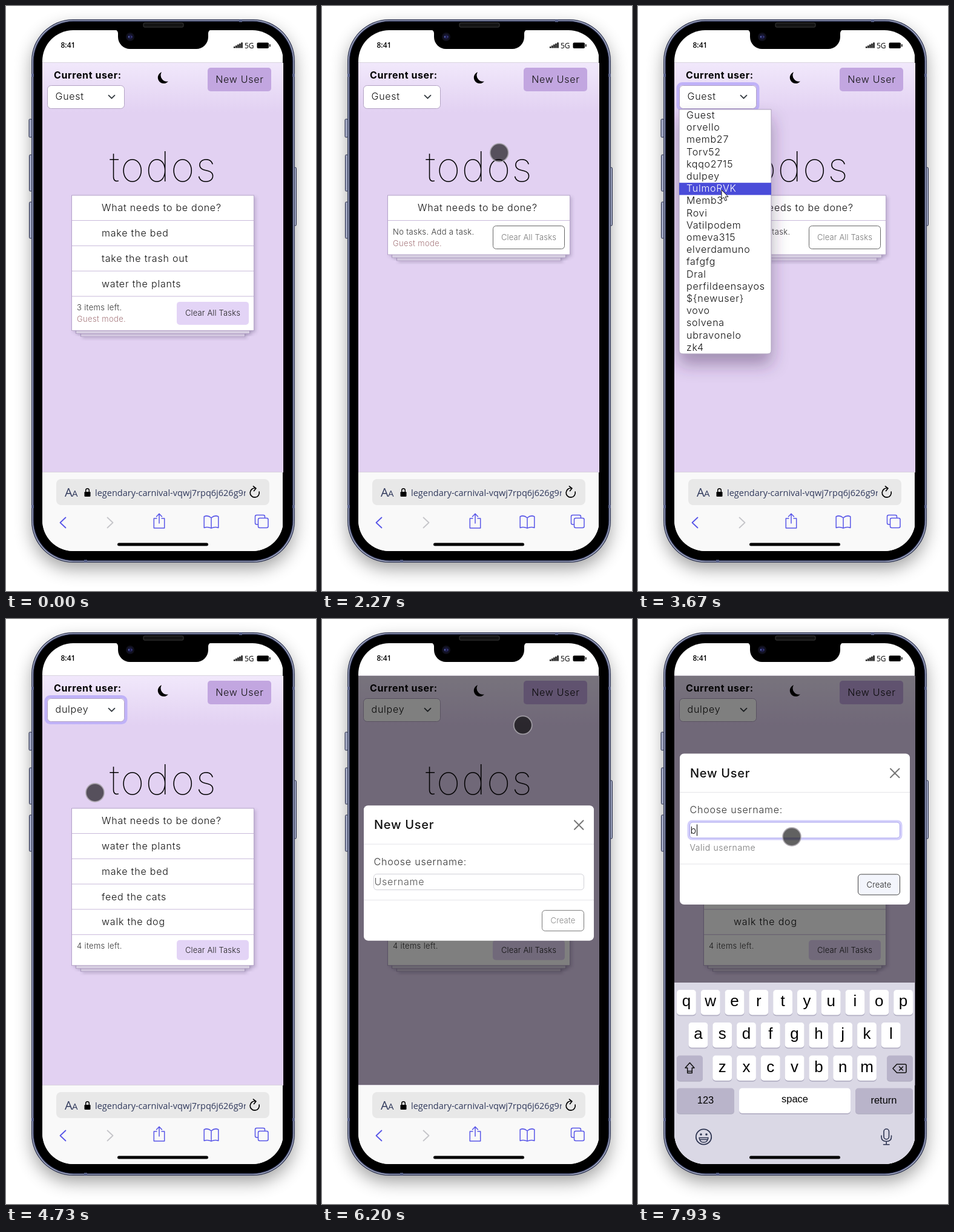
Animation of 512x967 px, one loop 8000 ms. Source, as an HTML page:

```html
<!DOCTYPE html>
<html lang="en">
<head>
<meta charset="utf-8">
<title>Todo app on a phone</title>
<style>
html, body { margin: 0; height: 100%; overflow: hidden; background: #fff; }
svg { display: block; width: 512px; height: 967px; }
text { font: 300 16px Inter, sans-serif; letter-spacing: .8px; fill: #111; white-space: pre; }
.reg { font-weight: 350; letter-spacing: .75px; }
.bold { font-weight: 700; letter-spacing: .6px; fill: #000; }
.small { font-size: 13px; letter-spacing: .35px; fill: #333; }
.btn { font-size: 13px; letter-spacing: .15px; fill: #222; font-weight: 350; }
.mid { text-anchor: middle; }
.title { font-size: 68px; font-weight: 100; letter-spacing: 2px; fill: #000; }
.head { font-size: 20px; font-weight: 450; letter-spacing: .7px; }
.sys { font: 600 12px "Open Sans", sans-serif; letter-spacing: 0; fill: #000; }
.url { font: 400 14.5px "Open Sans", sans-serif; letter-spacing: 0; fill: #30395c; }
.key { font: 400 26px "Liberation Sans", Arial, sans-serif; letter-spacing: 0; text-anchor: middle; fill: #000; }
.word { font-size: 16.5px; }
.line { fill: none; stroke-linecap: round; stroke-linejoin: round; }
</style>
</head>
<body>
<svg viewBox="0 0 512 967">
  <defs>
    <clipPath id="screen"><rect x="60" y="40" width="398" height="861" rx="51"/></clipPath>
    <clipPath id="page"><rect x="60" y="94" width="398" height="677"/></clipPath>
    <clipPath id="urlClip"><rect x="140" y="785" width="256" height="38"/></clipPath>
    <linearGradient id="sky" x2="0" y2="1"><stop stop-color="#f1e8fb"/><stop offset="1" stop-color="#e2d1f2"/></linearGradient>
    <filter id="soft" x="-20%" y="-10%" width="140%" height="120%"><feGaussianBlur stdDeviation="15"/></filter>
    <filter id="drop" x="-50%" y="-20%" width="200%" height="150%"><feDropShadow dx="0" dy="17" stdDeviation="14" flood-color="#3c2850" flood-opacity=".4"/></filter>
    <filter id="lift" x="-10%" y="-20%" width="120%" height="150%"><feDropShadow dx="3" dy="3" stdDeviation="2.5" flood-color="#503c64" flood-opacity=".22"/></filter>
  </defs>
  <rect width="512" height="967" fill="#fff"/>
  <rect x="44" y="36" width="431" height="893" rx="66" opacity=".4" filter="url(#soft)"/>
  <g id="phone"></g>
  <g clip-path="url(#screen)">
    <rect x="60" y="40" width="397" height="861" fill="#fff"/>
    <g id="bars"></g>
    <g clip-path="url(#page)">
      <rect x="60" y="94" width="398" height="677" fill="#e2d1f2"/>
      <rect x="60" y="94" width="398" height="82" fill="url(#sky)"/>
      <g id="header"></g>
      <g id="card"></g>
      <g id="list"></g>
      <rect id="dim" x="60" y="94" width="398" height="677" opacity="0"/>
      <g id="modal"></g>
    </g>
    <path d="M60 93.5H457M60 770.5H457" stroke="#d9d4df"/>
    <g id="keys"></g>
    <rect x="184" y="887.5" width="150" height="5" rx="2.5"/>
  </g>
  <g id="notch"></g>
  <circle id="dot" r="15" fill="#000" fill-opacity=".62" stroke="#aaa6ad" stroke-width="1.8" stroke-opacity=".85"/>
  <path id="arrow" d="M0 0V15.5L3.6 12.2L6 18L8.6 16.9L6.2 11.3H11Z" fill="#fff" stroke="#111" stroke-linejoin="round"/>
</svg>
<script>
const LOOP = 8000;
const $ = id => document.getElementById(id);
const text = (x, y, s, cls = '', more = '') => `<text x="${x}" y="${y}" class="${cls}" ${more}>${s}</text>`;
const rect = (x, y, w, h, fill, r = 0, more = '') =>
  `<rect x="${x}" y="${y}" width="${w}" height="${h}" fill="${fill}" rx="${r}" ${more}/>`;
const line = (d, color, w = 1.5) => `<path class="line" d="${d}" stroke="${color}" stroke-width="${w}"/>`;
const clamp = v => Math.min(1, Math.max(0, v));
const ramp = (t, from, dur) => clamp((t - from) / dur);
const easeOut = p => 1 - (1 - p) ** 2;

const users = ['Guest', 'orvello', 'memb27', 'Torv52', 'kqqo2715', 'dulpey', 'TulmoRVK', 'Memb3', 'Rovi',
  'Vatilpodem', 'omeva315', 'elverdamuno', 'fafgfg', 'Dral', 'perfildeensayos', '${newuser}', 'vovo',
  'solvena', 'ubravonelo', 'zk4'];
const picked = users[5];
const ROW = 20.2, LIST_TOP = 171;

// Key points of the pointer: time, x, y
const dotPath = [[0, 522, 977], [330, 372, 650], [550, 290, 508], [730, 357, 469], [900, 357, 469], [1000, 357, 473],
  [1270, 357, 473], [1670, 357, 467], [1980, 357, 467], [2270, 293, 243], [2560, 190, 134], [2800, 150, 147],
  [2930, 150, 147], [4130, 147, 287], [4850, 147, 287], [5250, 270, 190], [5670, 390, 124], [6020, 390, 124],
  [6200, 332, 175], [6520, 276, 340], [6830, 254, 446], [6980, 254, 446], [7400, 254, 360], [8000, 254, 360]];
const arrowPath = [[2930, 150, 147], [3300, 145, 235], [3600, 138, 304], [3700, 138, 304], [3930, 147, 286], [4200, 147, 286]];

function slope(path, i, c) {
  if (!i || i === path.length - 1) return 0;
  const [a, b, d] = [path[i - 1], path[i], path[i + 1]];
  return (b[c] - a[c]) * (d[c] - b[c]) <= 0 ? 0 : (d[c] - a[c]) / (d[0] - a[0]);
}

function along(path, t) {
  let i = path.findIndex(p => p[0] > t) - 1;
  if (i < 0) i = t < path[0][0] ? 0 : path.length - 2;
  const a = path[i], b = path[i + 1], span = b[0] - a[0], p = clamp((t - a[0]) / span);
  return [1, 2].map(c => {
    const p2 = p * p, p3 = p2 * p;
    return (2 * p3 - 3 * p2 + 1) * a[c] + (p3 - 2 * p2 + p) * span * slope(path, i, c) +
      (3 * p2 - 2 * p3) * b[c] + (p3 - p2) * span * slope(path, i + 1, c);
  });
}

const cache = {};
function put(id, html) {
  if (cache[id] !== html) $(id).innerHTML = cache[id] = html;
}

function phone() {
  const side = (x, y, h) => rect(x, y, 4.5, h, '#a3a9c4', 1.5, 'stroke="#262c48"');
  return side(38, 187, 30) + side(38.5, 246, 60) + side(38.5, 324, 60) + side(475, 267, 96) +
    rect(42, 22, 435, 898, '#2c3350', 69) + rect(43.2, 23.2, 432.6, 895.6, '#a9afc9', 68) +
    rect(44.6, 24.6, 429.8, 892.8, '#2a3050', 67) + rect(46, 26, 427, 890, '#000', 65.5) +
    [[42, 112, 4, 5], [473, 112, 4, 5], [42, 825, 4, 5], [473, 825, 4, 5], [129, 915.5, 5, 4], [385, 22.5, 5, 4]]
      .map(b => rect(...b, '#5d668f')).join('') +
    rect(227, 28, 66, 7, '#141414', 2, 'stroke="#3b3b3b"');
}

function notch() {
  return '<path d="M179 39H340A6 6 0 0 0 334 45V51A20 20 0 0 1 314 71H205A20 20 0 0 1 185 51V45A6 6 0 0 0 179 39Z"/>' +
    '<circle cx="205" cy="51" r="7" fill="#10101d"/><circle cx="205" cy="51" r="4" fill="#1b1b42"/>' +
    '<circle cx="203" cy="51" r="1.3" fill="#5560a8"/><circle cx="207.5" cy="51" r="1.2" fill="#3d3d86"/>';
}

function bars() {
  const blue = '#5856e8';
  let s = text(90.5, 69, '8:41', 'sys') + text(394, 70, '5G', 'sys', 'style="font-weight:500"');
  for (let i = 0; i < 5; i++) s += rect(376 + i * 3.1, 67 - i * 1.7, 2.3, 2.5 + i * 1.7, '#000', .6);
  s += rect(414.5, 60.5, 19.5, 9.5, '#000', 2) + rect(435, 63, 1.6, 4.5, '#000', .8);
  s += rect(60, 770, 397, 131, '#f9f9f9') + rect(83, 782, 352, 43, '#e8e8e8', 8);
  s += text(97, 811, 'A', 'url', 'style="font-size:20px"') + text(109, 811, 'A', 'url', 'style="font-size:15px"');
  s += rect(129.5, 803, 10, 8, '#000', 1.3) + line('M131.7 803V800.5A2.8 2.8 0 0 1 137.3 800.5V803', '#000');
  s += `<g clip-path="url(#urlClip)">${text(147, 810, 'legendary-carnival-vqwj7rpq6j626g9r', 'url')}</g>`;
  s += line('M412.5 797.2A7.6 7.6 0 1 0 418.2 803M408.5 793.8L413 797.3L409.5 801.5', '#000', 1.7);
  s += line('M98.5 845.5L89.5 854L98.5 862.5', blue, 1.8) + line('M167.5 845.5L176.5 854L167.5 862.5', '#c6c6ca', 1.8);
  s += line('M249 847H244.3V863H261.7V847H257M253 855V839.5M248.5 844L253 839.3L257.5 844', blue);
  s += line('M339 846Q333 841 327.2 844V862.5Q333 860 339 863.2Q345 860 350.8 862.5V844Q345 841 339 846V863', blue);
  s += line('M416 857H414Q411.5 857 411.5 854.5V844Q411.5 841.5 414 841.5H425Q427.5 841.5 427.5 844V846', blue);
  return s + rect(416.5, 846.5, 16.5, 16, 'none', 2.5, `stroke="${blue}" stroke-width="1.5"`);
}

function header(user, ring) {
  return text(79, 120, 'Current user:', 'bold') +
    rect(66, 128.5, 132, 43, 'none', 7, `stroke="#c0b2f8" stroke-width="5" opacity="${ring}"`) +
    rect(68.5, 131.5, 127, 38, '#fff', 6, 'stroke="#b3a3c4"') +
    text(81.5, 155, user, 'reg') + line('M169.5 147.7L174.5 152.7L179.5 147.7', '#343a40', 1.8) +
    '<path d="M257 109.3A9.7 9.7 0 1 0 268 124.5A10.3 10.3 0 0 1 257 109.3Z"/>' +
    rect(333, 102, 105, 39, '#c2a6e0', 5) + text(386, 127, 'New User', 'reg mid') +
    text(260, 290, 'todos', 'title mid');
}

function card(tasks, guest) {
  const top = 354.5 + tasks.length * 41.8, foot = guest ? 56.5 : 51, end = top + foot;
  const edge = 'stroke="#b5a3c9" filter="url(#lift)"';
  let s = rect(123.5, end - 10, 271, 20, '#e9def3', 0, edge) + rect(115.5, end - 10, 287, 15, '#eee6f6', 0, edge) +
    rect(108.5, 313, 301, end - 313, '#fff', 0, edge) + text(158, 339, 'What needs to be done?', 'reg');
  tasks.forEach((task, i) => s += text(158, 381 + i * 41.8, task));
  for (let i = 0; i <= tasks.length; i++) s += rect(109, 354 + i * 41.8, 300, 1, '#c9b9da');
  s += text(117, top + 23, tasks.length ? tasks.length + ' items left.' : 'No tasks. Add a task.', 'small');
  if (guest) s += text(117, top + 42, 'Guest mode.', 'small', 'style="fill:#a6777c"');
  const h = guest ? 38 : 33;
  s += tasks.length ? rect(282, top + 9, 119, h, '#e3d4f6', 5)
    : rect(282.5, top + 9, 118, h, '#fff', 5, 'stroke="#666"');
  return s + text(341.5, top + h / 2 + 13.5, 'Clear All Tasks', 'btn mid', tasks.length ? '' : 'style="fill:#777"');
}

function list(hover) {
  let s = '<path filter="url(#drop)" d="M68 171H220V569Q220 575 214 575H74Q68 575 68 569Z" fill="#fff" stroke="#a89bb8"/>' +
    rect(68, LIST_TOP + hover * ROW, 152, ROW, '#4a4cd9');
  users.forEach((u, i) => s += text(80, 186 + i * ROW, u, 'reg', i === hover ? 'style="fill:#fff"' : ''));
  return s;
}

function modal(typed, focus, caret) {
  const grow = typed ? 26 : 0, h = 223.5 + grow;
  let s = rect(69, 0, 380, h, '#fff', 7) + text(86, 39, 'New User', 'head') +
    line('M417 25L431.5 39.5M431.5 25L417 39.5', '#777', 2) +
    rect(69, 63.5, 380, 1, '#e4e4e8') + rect(69, 156 + grow, 380, 1, '#e4e4e8') +
    text(85.5, 98.5, 'Choose username:', '', 'style="fill:#333"');
  if (focus) s += rect(83.5, 112, 351, 29, 'none', 6, `stroke="#d3cffb" stroke-width="4" opacity="${focus}"`);
  s += rect(85.5, 113.5, 347, 26, '#fff', 5, `stroke="${focus ? '#a7a2ec' : '#d0d0d6'}"`) +
    text(86.5, 132, typed || 'Username', 'reg', typed ? '' : 'style="fill:#555"');
  if (caret) s += rect(typed ? 97 : 87, 117, 1, 19, '#000');
  if (typed) s += text(85.5, 160, 'Valid username', '', 'style="font-size:14px;letter-spacing:.6px;fill:#777"');
  return s + rect(363.5, 173.5 + grow, 69, 34, typed ? '#f3f5fc' : '#fff', 5, `stroke="${typed ? '#444' : '#777'}"`) +
    text(398, 195 + grow, 'Create', 'btn mid', typed ? '' : 'style="fill:#888"');
}

function keys() {
  const cap = (x, y, w, fill = '#fff') => rect(x, y + 1.3, w, 42, '#b3b0c4', 5) + rect(x, y, w, 41.5, fill, 5);
  const gray = '#b9b4ca', ink = '#111';
  let s = rect(60, 601, 397, 300, '#dad8e5');
  [['qwertyuiop', 64, 613], ['asdfghjkl', 83.5, 667], ['zxcvbnm', 123.3, 721.5]].forEach(([row, x, y]) =>
    [...row].forEach((c, i) => s += cap(x + i * 39.8, y, 31.8) + text(x + i * 39.8 + 15.9, y + 27, c, 'key')));
  s += cap(64, 721.5, 43, gray) + cap(411, 721.5, 43, gray);
  s += line('M85.5 733.5L93 742H89.3V750.5H81.7V742H78Z', ink) + line('M81.7 747.5H89.3', ink);
  s += line('M421 743L427.5 736H441Q443 736 443 738V748Q443 750 441 750H427.5ZM431.5 740L437.5 746M437.5 740L431.5 746', ink, 1.6);
  s += cap(64, 775.5, 95, gray) + cap(167, 775.5, 184) + cap(359, 775.5, 95, gray);
  s += text(111.5, 801, '123', 'key word') + text(259, 799, 'space', 'key word') + text(406, 801, 'return', 'key word');
  s += '<circle cx="108.5" cy="856" r="12.7" fill="none" stroke="#2c3350" stroke-width="1.8"/>' +
    '<circle cx="104" cy="852" r="1.8" fill="#2c3350"/><circle cx="113" cy="852" r="1.8" fill="#2c3350"/>' +
    line('M101 857.5H116Q115 865 108.5 865Q102 865 101 857.5ZM102 860.5H115', '#2c3350');
  return s + rect(406, 843, 8.5, 17, 'none', 4.2, 'stroke="#2c3350" stroke-width="1.6"') +
    line('M402 854V856Q402 863.5 410.2 863.5Q418.5 863.5 418.5 856V854M410.2 863.5V868.5M405.5 868.7H415', '#2c3350', 1.6);
}

const home = ['make the bed', 'take the trash out', 'water the plants'];
const chores = ['water the plants', 'make the bed', 'feed the cats', 'walk the dog'];
const at = (el, [x, y]) => el.setAttribute('transform', `translate(${x.toFixed(2)} ${y.toFixed(2)})`);
const show = (el, on) => el.setAttribute('visibility', on ? 'visible' : 'hidden');

function draw(t) {
  const guest = t < 4470, open = t >= 2950 && t < 4130;
  const tasks = t < 1270 ? home : t < 2000 ? home.slice(0, 2) : guest ? [] : chores;
  const ring = ramp(t, 2870, 150) - ramp(t, 5730, 130);
  put('header', header(guest ? 'Guest' : picked, ring.toFixed(2)));
  put('card', card(tasks, guest));

  const tip = along(arrowPath, t);
  put('list', open ? list(Math.max(0, Math.floor((tip[1] - LIST_TOP) / ROW))) : '');
  at($('arrow'), tip);
  show($('arrow'), open);
  at($('dot'), along(dotPath, t));
  show($('dot'), !open);

  $('dim').setAttribute('opacity', ramp(t, 5870, 150) * .5);
  const rise = easeOut(ramp(t, 6970, 200)), typed = t >= 7920 ? 'b' : '';
  const top = 320.5 - 50 * (1 - easeOut(ramp(t, 6050, 300))) - 85 * rise - (typed ? 13 : 0);
  const caret = t >= 6970 && (t < 7470 || typed);
  put('modal', t < 6050 ? '' : modal(typed, ramp(t, 6970, 150), caret));
  $('modal').setAttribute('opacity', ramp(t, 6050, 150));
  at($('modal'), [0, top]);
  at($('keys'), [0, 300 * (1 - rise)]);
  show($('keys'), rise > 0);
}

put('phone', phone());
put('notch', notch());
put('bars', bars());
put('keys', keys());
const start = performance.now();
function tick() {
  draw((performance.now() - start) % LOOP);
  requestAnimationFrame(tick);
}
tick();
</script>
</body>
</html>
```
